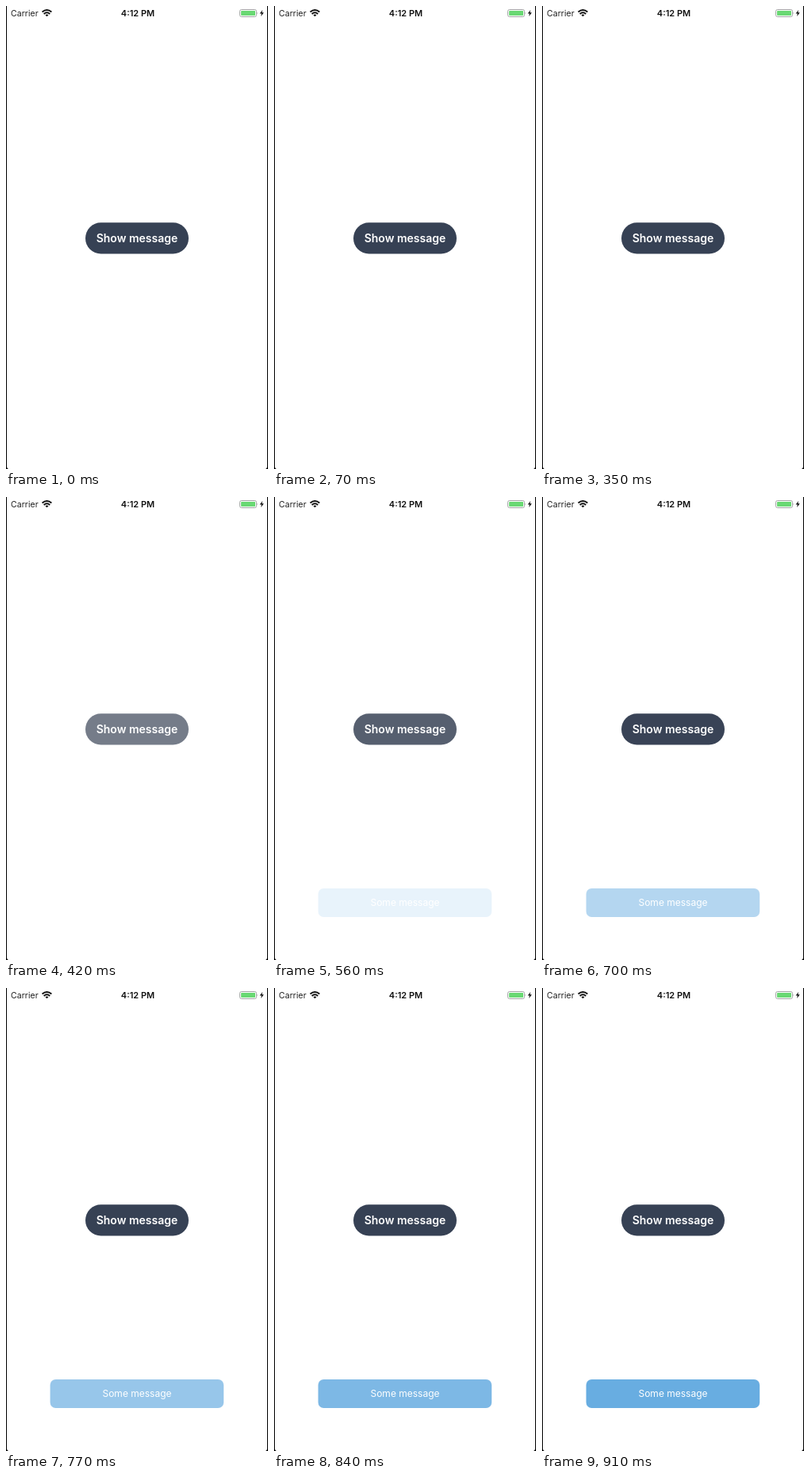
An HTML page for the animation above (2.38 s loop, 330x582 px).

```html
<!DOCTYPE html>
<html lang="en">
<head>
<meta charset="utf-8">
<title>Show message</title>
<style>
  html, body { margin: 0; width: 100%; height: 100%; overflow: hidden; background: #fff; }
  svg { display: block; width: 330px; height: 582px; font-family: Inter, Roboto, sans-serif; }
  .button { animation: press 2380ms step-end infinite; }
  .toast { animation: appear 2380ms step-end infinite; }

  /* Steps of 70 ms, written as shares of the 2380 ms loop */
  @keyframes press {
    0% { opacity: 1; }
    17.647% { opacity: .69; }
    23.529% { opacity: .84; }
    26.47% { opacity: .95; }
    29.411% { opacity: .985; }
    32.352%, 100% { opacity: 1; }
  }
  @keyframes appear {
    0% { opacity: 0; }
    23.529% { opacity: .15; }
    26.47% { opacity: .32; }
    29.411% { opacity: .5; }
    32.352% { opacity: .69; }
    35.294% { opacity: .86; }
    38.235%, 100% { opacity: 1; }
  }
</style>
</head>
<body>
<svg viewBox="0 0 330 582">
  <rect width="330" height="582" fill="#fff"/>
  <path d="M0 0H1V579Q1 581 3 582H0ZM330 0H329V579Q329 581 327 582H330Z" fill="#000"/>

  <g class="status">
    <text x="6" y="13" font-size="10.6" fill="#222">Carrier</text>
    <g fill="none" stroke="#111" stroke-width="1.9">
      <path d="M45.6 7.5Q51.5 2.5 57.4 7.5"/>
      <path d="M47.7 9.9Q51.5 6.7 55.3 9.9"/>
    </g>
    <path d="M49.5 11.2Q51.5 9.7 53.5 11.2L51.5 13.3Z" fill="#111"/>
    <text x="166" y="13" font-size="11" font-weight="600" fill="#111" text-anchor="middle">4:12 PM</text>
    <rect x="294.5" y="4.5" width="21" height="9" rx="2.2" fill="#fff" stroke="#a2a6a4"/>
    <rect x="296" y="6" width="18" height="6" rx=".8" fill="#69d873"/>
    <path d="M316.6 7.5Q318 9 316.6 10.5Z" fill="#999"/>
    <path d="M323 5L319.6 9.6H321.8L321.2 13L324.7 8.3H322.4Z" fill="#111"/>
  </g>

  <g class="button">
    <rect x="100" y="272.3" width="130" height="39.2" rx="19.6" fill="#364154"/>
    <text x="165" y="297" font-size="14" font-weight="600" fill="#fff" text-anchor="middle">Show message</text>
  </g>

  <g class="toast">
    <rect x="55.6" y="492" width="218.6" height="36" rx="7" fill="#68ade1"/>
    <text x="165" y="514.4" font-size="12" fill="#fff" text-anchor="middle">Some message</text>
  </g>
</svg>
</body>
</html>
```
